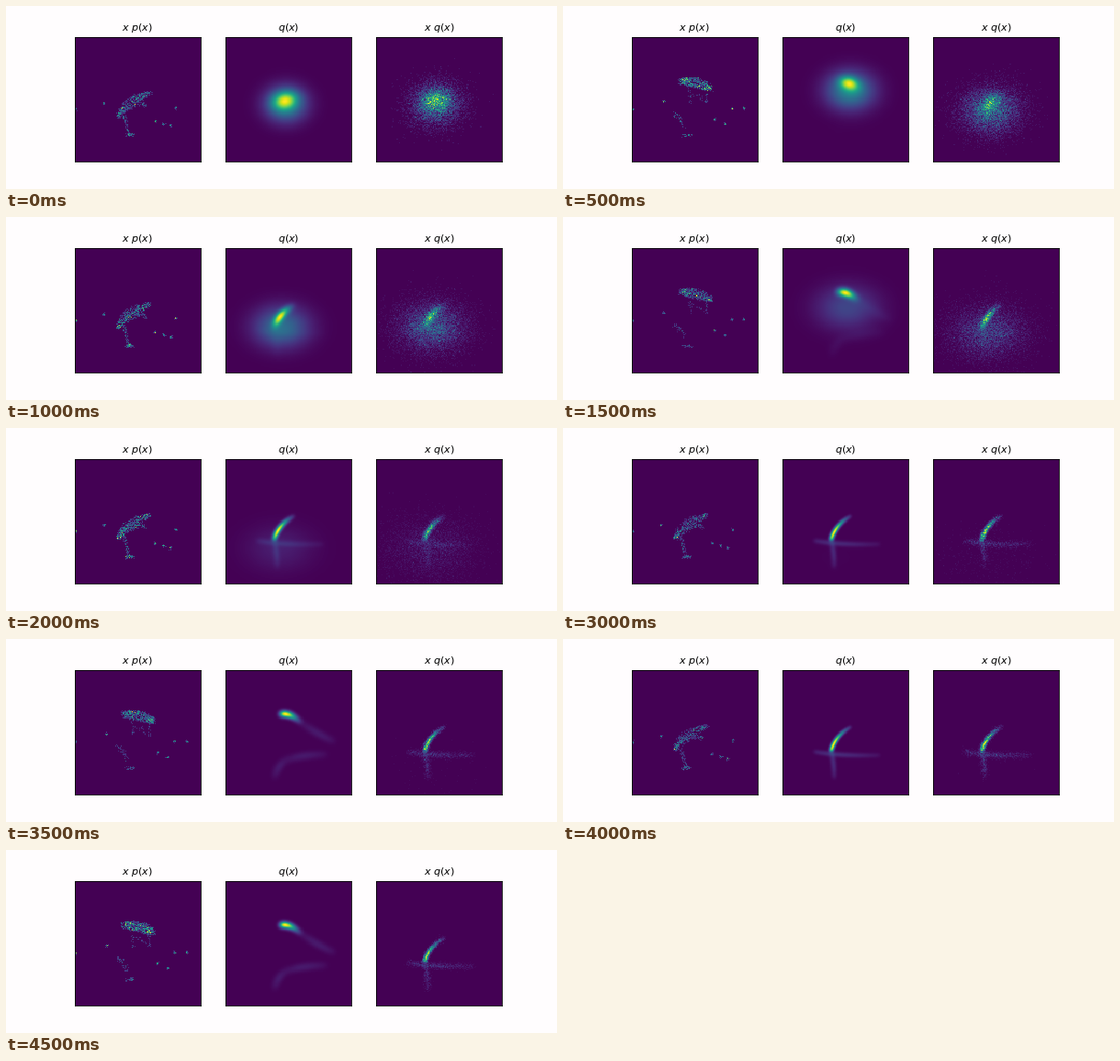
A matplotlib script that plays this animation: 600 px wide and 200 px high, repeating every 5 s.

```python
import numpy as np
import matplotlib.pyplot as plt
from matplotlib.animation import FuncAnimation

STEPS, STEP_MS = 10, 500
BINS = 128
SIDE, TOP = 136.76, 33.0           # panel side and top edge in pixels

plt.rcParams["font.family"] = "DejaVu Sans"
axis = (np.arange(BINS) + 0.5) * SIDE / BINS
GX, GY = np.meshgrid(axis, axis + TOP)

# Ridges and faint side branches as Bezier key points (x in panel, y on stage)
ARM = dict(
    ridge=[(53, 122), (56, 107), (74, 96)], width=1.5, faint=0.12,
    branches=[[(53, 122), (56, 135), (56, 152)],
              [(35, 123), (60, 128), (105, 127)]])
CAP = dict(
    ridge=[(60, 82), (70, 80), (82, 91)], width=2.5, faint=0.07,
    branches=[[(53, 152), (56, 138), (66, 132)],
              [(66, 132), (85, 126), (110, 126)],
              [(82, 91), (100, 104), (118, 112)]])


def bezier(points, t):
    a, b, c = np.array(points, float)
    t = np.asarray(t)[:, None]
    return (1 - t) ** 2 * a + 2 * t * (1 - t) * b + t ** 2 * c


def blob(x, y, sx, sy):
    return np.exp(-0.5 * (((GX - x) / sx) ** 2 + ((GY - y) / sy) ** 2))


def stroke(points, sx, sy, centre=0.5, spread=0.4):
    """Soft curve, strongest at the given place along it, peak 1."""
    t = np.linspace(0, 1, 50)
    weight = np.exp(-0.5 * ((t - centre) / spread) ** 2)
    total = sum(w * blob(x, y, sx, sy)
                for w, (x, y) in zip(weight, bezier(points, t)))
    return total / total.max()


def model(shape, step):
    """A round cloud that sharpens into the ridge as fitting goes on."""
    early, slow = np.exp(-step / 1.6), np.exp(-step / 4)
    centre = 0.2 + 0.5 * slow
    width = shape["width"] + 4.5 * early
    total = 0.55 * stroke(shape["ridge"], width * (1 + 0.4 * early), width,
                          centre, 0.42 - 0.3 * slow)
    x, y = bezier(shape["ridge"], [centre])[0]
    haze = 0.5 * np.exp(-(step / 2.6) ** 2)
    total += haze * blob(x + 1, y + 4 + 4 * step, 15 + 2.5 * step, 13 + step)
    faint = 0.55 * shape["faint"] * (1 - np.exp(-(step / 4) ** 2))
    for branch in shape["branches"]:
        total += faint * stroke(branch, 1.3 * width, 1.3 * width)
    return total / total.max()


def strew(rng, points, half, count, swell=0.0):
    """Random points along a curve, spread wider in its middle."""
    t = rng.random(count)
    reach = half + swell * np.sin(np.pi * t)
    return bezier(points, t) + rng.uniform(-1, 1, (count, 2)) * reach[:, None]


def islands(rng, spots, size=1.5, count=14):
    return [np.array(s) + rng.normal(0, size / 2, (count, 2)) for s in spots]


def arm_points(rng):
    return [
        strew(rng, [(47, 121), (55, 104), (82, 95)], 2.0, 420, 3.0),
        strew(rng, [(54, 120), (55, 130), (60, 142)], 1.7, 60),
        strew(rng, [(55, 142), (59, 139), (64, 141)], 1.7, 45),
        strew(rng, [(60, 112), (74, 102), (77, 110)], 2.0, 50),
        *islands(rng, [(32, 106), (1, 113), (110, 111), (87, 126),
                       (97, 129), (104, 131)]),
    ]


def cap_points(rng):
    return [
        strew(rng, [(53, 82), (70, 82), (85, 90)], 3.0, 520, 2.5),
        strew(rng, [(62, 91), (63, 98), (64, 106)], 1.4, 14),
        strew(rng, [(81, 93), (82, 100), (82, 106)], 1.4, 16),
        strew(rng, [(64, 97), (71, 95), (79, 105)], 2.0, 14),
        strew(rng, [(46, 118), (53, 121), (57, 132)], 2.5, 36),
        strew(rng, [(55, 142), (60, 141), (65, 141)], 1.8, 30),
        *islands(rng, [(35, 104), (1, 113), (90, 124), (101, 129),
                       (109, 112), (122, 112)]),
    ]


def histogram(points):
    x, y = np.concatenate(points).T
    return np.histogram2d(y, x, bins=BINS,
                          range=[[TOP, TOP + SIDE], [0, SIDE]])[0]


ARM_MODEL = [model(ARM, k) for k in range(STEPS)]
CAP_MODEL = [model(CAP, k) for k in range(STEPS)]

fig, axes = plt.subplots(1, 3, figsize=(6, 2), dpi=100)
fig.set_facecolor("#fffdfe")
fig.subplots_adjust(bottom=0.1053, top=0.8753)
images = []
for ax, title in zip(axes, ["$x ~ p(x)$", "$q(x)$", "$x ~ q(x)$"]):
    ax.set_title(title, fontsize=8, pad=4.5)
    ax.set_xticks([])
    ax.set_yticks([])
    for spine in ax.spines.values():
        spine.set_linewidth(0.6)
    images.append(ax.imshow(np.zeros((BINS, BINS)), cmap="viridis",
                            interpolation="nearest", vmin=0, vmax=1))


def update(step):
    rng = np.random.default_rng(100 + step)
    odd = step % 2 == 1
    panels = [histogram(cap_points(rng) if odd else arm_points(rng)),
              (CAP_MODEL if odd else ARM_MODEL)[step],
              rng.poisson(ARM_MODEL[step] * (12 + 2.5 * step))]
    for image, data in zip(images, panels):
        image.set_data(data / data.max())
    return images


anim = FuncAnimation(fig, update, frames=STEPS, interval=STEP_MS,
                     repeat=True, repeat_delay=0, blit=False)
plt.show()
```
